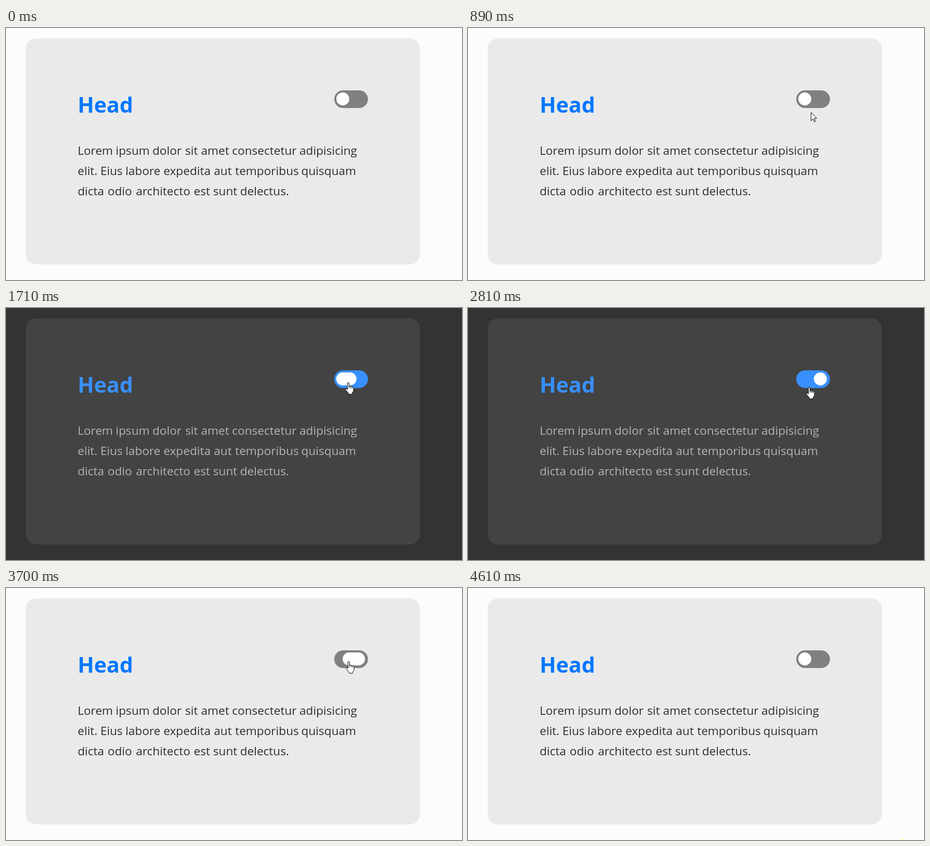
Write an HTML page that moves like this. It is 878 px wide and 485 px high and loops after 4690 ms.

```html
<!DOCTYPE html>
<html lang="en">
<head>
<meta charset="utf-8">
<title>Theme switch</title>
<style>
  html, body { margin: 0; width: 100%; height: 100%; overflow: hidden; }
  .stage {
    position: relative; width: 878px; height: 485px; overflow: hidden;
    background: var(--bg);
    animation: theme 4690ms step-end infinite;
  }
  .stage * { position: absolute; }
  .card { left: 38px; top: 20px; width: 759px; height: 435px; border-radius: 20px; background: var(--card); }
  svg { left: 0; top: 0; overflow: visible; }
  text { font: 22.6px "Open Sans", "Noto Sans", sans-serif; fill: var(--text); }
  .head { font-size: 41.2px; font-weight: 700; fill: var(--head); }

  .track { left: 632px; top: 120px; width: 65px; height: 34px; border-radius: 17px; background: var(--track); }
  .knob {
    left: 4px; top: 4px; width: 25px; height: 25px; border-radius: 12.5px; background: #fff;
    animation: slide 4690ms ease infinite, stretch 4690ms ease infinite;
  }

  .cursor { animation: move 4690ms linear infinite; fill: #fff; stroke: #000; }
  .hand { animation: hand 4690ms step-end infinite; }
  .arrow { animation: arrow 4690ms step-end infinite; }
  .click { fill: #ffff7d; animation: click 4690ms step-end infinite; }

  @keyframes theme {
    0%, 78.87%, 100% { --bg: #fcfcfc; --card: #eaeaea; --text: #2e2e2e; --head: #0077ff; --track: #808080; }
    36.42% { --bg: #333; --card: #434343; --text: #b4b4b4; --head: #3890ff; --track: #3890ff; }
  }

  /* The anchor moves from the knob's left edge to its right edge. */
  @keyframes slide {
    0%, 36.42% { left: 4px; transform: translateX(0%); }
    42.81%, 78.87% { left: 59px; transform: translateX(-100%); }
    85.27%, 100% { left: 4px; transform: translateX(0%); }
  }
  /* A press widens the knob, the release cuts that short. */
  @keyframes stretch {
    0%, 34.67% { width: 25px; animation-timing-function: cubic-bezier(.4, .1, .8, .75); }
    36.42% { width: 39px; }
    39.4%, 76.65% { width: 25px; animation-timing-function: cubic-bezier(.4, .1, .75, .8); }
    78.87% { width: 43px; }
    82.75%, 100% { width: 25px; }
  }

  @keyframes move {
    0%, 6.37% { transform: translate(768px, 490px); }
    6.39% { transform: translate(766px, 478px); }
    8.53% { transform: translate(752px, 435px); }
    10.66% { transform: translate(725px, 360px); }
    12.79% { transform: translate(697px, 280px); }
    14.93% { transform: translate(673px, 205px); }
    17.27%, 17.8% { transform: translate(663px, 178px); }
    18.95%, 22.28% { transform: translate(660px, 162px); }
    23.45% { transform: translate(658px, 153px); }
    28.57%, 33.58% { transform: translate(657px, 144px); }
    34.54%, 59.7% { transform: translate(658px, 143px); }
    59.89% { transform: translate(656px, 151px); }
    61.62%, 69.19% { transform: translate(650px, 177px); }
    73.35%, 82.09% { transform: translate(659px, 141px); }
    83.58% { transform: translate(668px, 175px); }
    85.29% { transform: translate(700px, 245px); }
    86.35% { transform: translate(745px, 320px); }
    87.63% { transform: translate(795px, 409px); }
    89.55% { transform: translate(812px, 445px); }
    92.75%, 100% { transform: translate(828px, 490px); }
  }
  @keyframes hand {
    0%, 60.23%, 82.84%, 100% { visibility: hidden; }
    23.45%, 71% { visibility: visible; }
  }
  @keyframes arrow {
    0%, 60.23%, 82.84%, 100% { visibility: visible; }
    23.45%, 71% { visibility: hidden; }
  }
  @keyframes click {
    0% { visibility: hidden; }
    98.28%, 100% { visibility: visible; }
  }
</style>
</head>
<body>
<div class="stage">
  <div class="card"></div>
  <div class="track"><div class="knob"></div></div>
  <svg width="878" height="485">
    <text class="head" x="138" y="163">Head</text>
    <text y="244">
      <tspan x="138">Lorem</tspan>
      <tspan x="211.3">ipsum</tspan>
      <tspan x="282">dolor</tspan>
      <tspan x="344.9">sit</tspan>
      <tspan x="375.5">amet</tspan>
      <tspan x="435.3">consectetur</tspan>
      <tspan x="565">adipisicing</tspan>
    </text>
    <text y="283">
      <tspan x="138">elit.</tspan>
      <tspan x="181.7">Eius</tspan>
      <tspan x="230">labore</tspan>
      <tspan x="303.3">expedita</tspan>
      <tspan x="400.3">aut</tspan>
      <tspan x="441.2">temporibus</tspan>
      <tspan x="568.6">quisquam</tspan>
    </text>
    <text y="322">
      <tspan x="138">dicta</tspan>
      <tspan x="195.8">odio</tspan>
      <tspan x="250.2">architecto</tspan>
      <tspan x="361.5">est</tspan>
      <tspan x="398.8">sunt</tspan>
      <tspan x="450.7">delectus.</tspan>
    </text>
    <circle class="click" cx="837" cy="497" r="13"/>
    <g class="cursor">
      <path class="arrow" d="M.5 .5V16.5L4.2 13L6.6 18.5L9 17.5L6.7 12H11.5Z"/>
      <g class="hand">
        <path transform="translate(-5 0)" stroke-linejoin="round" d="M4.5 2a1.5 1.5 0 0 1 3 0V7.5q1.6-.9 3 .5q1.7-.8 2.8 .7q2.4-.4 2.9 1.5V15q0 3-2.2 5q-.8 1.3-.8 3H7q-.5-2.2-3-5L.9 14.5q-.8-2.3 1.2-2.6q1.2 .2 2.4 2Z"/>
        <path transform="translate(-5 0)" fill="none" d="M7.5 7v4M10.5 8v3.5M13.3 9v3"/>
      </g>
    </g>
  </svg>
</div>
</body>
</html>
```
